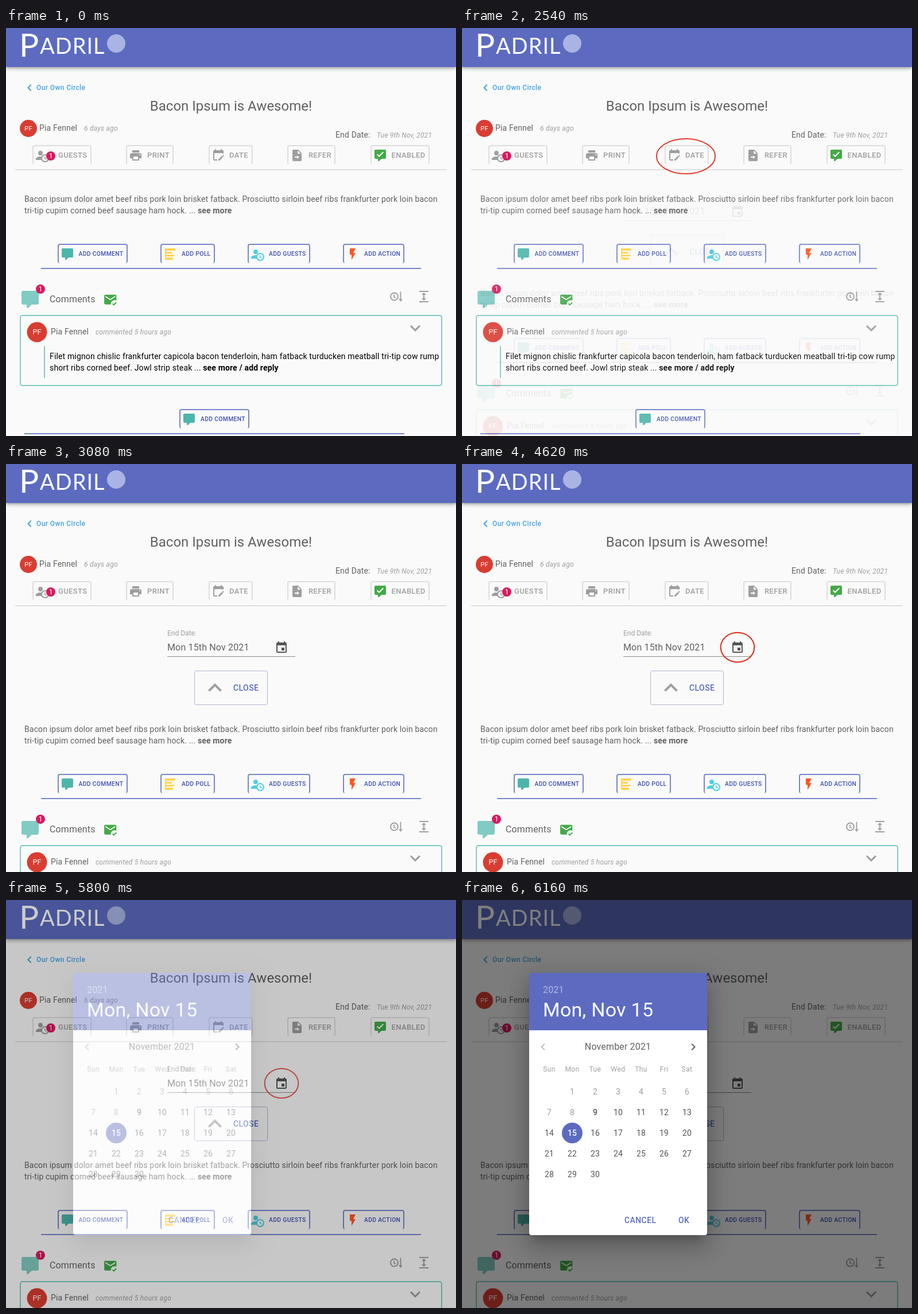
Animation of 784 by 711 pixels, one loop 8160 ms. Source, as an HTML page:

```html
<!DOCTYPE html>
<html lang="en">
<head>
<meta charset="utf-8">
<title>Discussion end date</title>
<style>
html, body { margin: 0; width: 100%; height: 100%; overflow: hidden; background: #fafafa; }
.scene { position: absolute; left: 0; top: 0; width: 784px; height: 711px; overflow: hidden; background: #fafafa; }
.scene > * { position: absolute; left: 0; top: 0; }
svg { width: 784px; height: 711px; font-family: Roboto, sans-serif; fill-rule: evenodd; }
svg text { white-space: pre; }
.bar { width: 784px; height: 68px; background: #5c6bc0;
  box-shadow: 0 2px 4px -1px #0003, 0 4px 5px #00000024, 0 1px 10px #0000001f; }
.shade { width: 784px; height: 711px; background: #00000080; }
.scene > .card { left: 117px; top: 127px; width: 310px; height: 457px; border-radius: 4px;
  background: linear-gradient(#5c6bc0 100px, #fff 100px);
  box-shadow: 0 11px 15px -7px #0003, 0 24px 38px 3px #00000024, 0 9px 46px 8px #0000001f; }
</style>
</head>
<body>
<script>
const GREY = '#9e9e9e', LIGHT = '#dedede', INK = '#616161', INDIGO = '#5c6bc0', EDGE = '#7986cb',
  DEEP = '#3f51b5', MINT = '#80cbc4', GREEN = '#43a947', RED = '#d93d32', PINK = '#d81b60';

// Icons on a 24 px grid
const COMMENT = 'M9,22A1,1 0 0,1 8,21V18H4A2,2 0 0,1 2,16V4C2,2.89 2.9,2 4,2H20A2,2 0 0,1 22,4V16A2,2 0 0,1 20,18H13.9L10.2,21.71C10,21.9 9.75,22 9.5,22Z';
const ICON = {
  comment: COMMENT,
  enabled: COMMENT + 'M16.6 5.6L10 12.2 7.4 9.6 6 11 10 15 18 7Z',
  left: 'M15.41,16.58L10.83,12L15.41,7.41L14,6L8,12L14,18Z',
  right: 'M8.59,16.58L13.17,12L8.59,7.41L10,6L16,12L10,18Z',
  down: 'M7.41,8.58L12,13.17L16.59,8.58L18,10L12,16L6,10Z',
  up: 'M7.41,15.41L12,10.83L16.59,15.41L18,14L12,8L6,14Z',
  guests: 'M10.63,14.1C12.23,10.58 16.38,9.03 19.9,10.63C23.42,12.23 24.97,16.38 23.37,19.9C22.24,22.4 19.75,24 17,24C14.3,24 11.83,22.44 10.67,20H1V18C1.06,16.86 1.84,15.93 3.34,15.18C4.84,14.43 6.72,14.04 9,14C9.57,14 10.11,14.05 10.63,14.1ZM5.07,8A3.93,3.97 0 1,1 12.93,8A3.93,3.97 0 1,1 5.07,8ZM17,22A5,5 0 0,0 22,17A5,5 0 0,0 17,12A5,5 0 0,0 12,17A5,5 0 0,0 17,22M16,14H17.5V16.82L19.94,18.23L19.19,19.53L16,17.69V14Z',
  print: 'M18,3H6V7H18M19,12A1,1 0 0,1 18,11A1,1 0 0,1 19,10A1,1 0 0,1 20,11A1,1 0 0,1 19,12M16,19H8V14H16M19,8H5A3,3 0 0,0 2,11V17H6V21H18V17H22V11A3,3 0 0,0 19,8Z',
  date: 'M19,3H18V1H16V3H8V1H6V3H5A2,2 0 0,0 3,5V19A2,2 0 0,0 5,21H10V19H5V8H19V9H21V5A2,2 0 0,0 19,3M21.7,13.35L20.7,14.35L18.65,12.35L19.65,11.35C19.85,11.14 20.19,11.13 20.42,11.35L21.7,12.63C21.89,12.83 21.89,13.15 21.7,13.35M12,18.94L18.07,12.88L20.12,14.88L14.06,21H12Z',
  refer: 'M13,9V3.5L18.5,9M6,2C4.89,2 4,2.89 4,4V20A2,2 0 0,0 6,22H18A2,2 0 0,0 20,20V8L14,2ZM8 14h4v-2l4 3-4 3v-2h-4z',
  poll: 'M2 2H20V6H4V8H14V11H4V13H18V16H4V18H16V22H2Z',
  flash: 'M7,2V13H10V22L17,10H13L17,2Z',
  mail: 'M13 19c0-3.31 2.69-6 6-6 1.1 0 2.12.3 3 .81V6a2 2 0 0 0-2-2H4c-1.11 0-2 .89-2 2v12a2 2 0 0 0 2 2h9.09c-.05-.33-.09-.66-.09-1M4 8V6l8 5 8-5v2l-8 5-8-5m13.75 14.16-2.75-3L16.16 18l1.59 1.59L21.34 16l1.16 1.41-4.75 4.75',
  expand: 'M4 2H20V4H4ZM4 20H20V22H4ZM13 9h3l-4-4-4 4h3v6H8l4 4 4-4h-3z',
  calendar: 'M19,19H5V8H19M16,1V3H8V1H6V3H5C3.89,3 3,3.89 3,5V19A2,2 0 0,0 5,21H19A2,2 0 0,0 21,19V5C21,3.89 20.1,3 19,3H18V1M17,12H12V17H17Z'
};

const text = (x, y, s, size, fill, more = '', gap = .15) =>
  `<text x="${x}" y="${y}" font-size="${size}" fill="${fill}" letter-spacing="${gap}" ${more}>${s}</text>`;
const mid = 'text-anchor="middle"', medium = 'font-weight="500"', italic = 'font-style="italic"';
const icon = (name, x, y, fill, k = 1) =>
  `<path d="${ICON[name]}" fill="${fill}" transform="translate(${x} ${y}) scale(${k})"/>`;
const rect = (x, y, w, h, fill) => `<rect x="${x}" y="${y}" width="${w}" height="${h}" fill="${fill}"/>`;
const frame = (x, y, w, h, stroke, width) =>
  `<rect x="${x}" y="${y}" width="${w}" height="${h}" rx="3.5" fill="none" stroke="${stroke}" stroke-width="${width}"/>`;
const disc = (x, y, r, fill) => `<circle cx="${x}" cy="${y}" r="${r}" fill="${fill}"/>`;
const badge = (x, y) => disc(x, y, 8, PINK) + text(x, y + 4, 1, 12, '#fff', mid, 0);
const ring = (x, y, rx, ry) =>
  `<ellipse cx="${x}" cy="${y}" rx="${rx}" ry="${ry}" fill="none" stroke="#dd2c1a" stroke-width="2"/>`;

// Rounded outline without a bottom edge; its sides taper off
function tab(l, r, t, fill) {
  const b = t + 34;
  return `<path fill="${fill}" d="M${l + 4} ${b}A4 4 0 0 1 ${l} ${b - 4}V${t + 4}a4 4 0 0 1 4 -4H${r - 4}a4 4 0 0 1 4 4V${b - 4}a4 4 0 0 1 -4 4A2 4 0 0 0 ${r - 2} ${b - 4}V${t + 4}a2 2 0 0 0 -2 -2H${l + 4}a2 2 0 0 0 -2 2V${b - 4}A2 4 0 0 0 ${l + 4} ${b}Z"/>`;
}
const tool = (l, r, name, ix, tx, label, fill = GREY) =>
  tab(l, r, 204, LIGHT) + icon(name, ix, 210, fill) + text(tx, 226, label, 13, GREY, medium, .37);
const add = (l, r, t, name, ix, tx, label, fill) =>
  tab(l, r, t, EDGE) + icon(name, ix, t + 6, fill) + text(tx, t + 21, label, 10.4, DEEP, medium, .297);

const header = () =>
  text(23, 50, 'P', 57, '#fff', 'font-family="Lato, sans-serif"', 0) +
  text(59, 45, 'ADRIL', 38, '#fff', 'font-family="Lato, sans-serif"', 1) +
  disc(192, 27, 16, '#a9b4e4') +
  icon('left', 29, 92, '#42a0dc') + text(53, 108, 'Our Own Circle', 12, '#42a5e5', medium, .4) +
  text(392, 144, 'Bacon Ipsum is Awesome!', 24, INK, mid, 0) +
  disc(39, 175, 15, RED) + text(39, 179, 'PF', 11, '#fff', mid) +
  text(58, 179, 'Pia Fennel', 14, INK) + text(136, 179, '6 days ago', 12, GREY, italic, .26) +
  text(574, 191, 'End Date:', 14, INK) + text(646, 191, 'Tue 9th Nov, 2021', 12, GREY, italic, .2) +
  tool(46, 149, 'guests', 51, 91, 'GUESTS') + badge(78, 223) +
  tool(209, 292, 'print', 214, 246, 'PRINT') +
  tool(353, 430, 'date', 358, 389, 'DATE') +
  tool(490, 574, 'refer', 495, 527, 'REFER') +
  tool(635, 738, 'enabled', 640, 671.5, 'ENABLED', GREEN) +
  rect(16, 246, 752, 2, '#e0e0e0');

const bold = s => `<tspan font-weight="700">${s}</tspan>`;
const content = shift => `<g transform="translate(0 ${shift})">` +
  text(32, 303, 'Bacon ipsum dolor amet beef ribs pork loin brisket fatback. Prosciutto sirloin beef ribs frankfurter pork loin bacon', 14, INK) +
  text(32, 323, 'tri-tip cupim corned beef sausage ham hock. ... ' + bold('see more'), 14, INK) +
  add(90, 212, 376, 'comment', 95, 126.5, 'ADD COMMENT', '#4db6ac') +
  add(269, 364, 376, 'poll', 275, 306, 'ADD POLL', '#ffd54f') +
  add(421, 530, 376, 'guests', 426, 458, 'ADD GUESTS', '#4dd0e1') +
  add(587, 694, 376, 'flash', 592, 624, 'ADD ACTION', '#ff5722') +
  rect(61, 418, 662, 2, EDGE) +
  icon('comment', 24, 455, MINT, 1.5) + badge(60, 455) +
  text(76, 478, 'Comments', 16, INK) + icon('mail', 169, 460.5, GREEN, 1.06) +
  `<path d="M676 464.5v4l3 2M687.5 459.5v14" fill="none" stroke="${GREY}" stroke-width="1.8"/>` +
  `<circle cx="676.5" cy="468" r="6.5" fill="none" stroke="${GREY}" stroke-width="2"/>` +
  `<path d="M684 472.5h7l-3.5 4.5z" fill="${GREY}"/>` +
  icon('expand', 716, 456, GREY) +
  frame(25, 501, 734, 122, MINT, 2) +
  disc(54, 530, 17.5, RED) + text(54, 534, 'PF', 12.5, '#fff', mid) +
  text(78, 534, 'Pia Fennel', 14, INK) + text(156, 534, 'commented 5 hours ago', 12, GREY, italic, .26) +
  icon('down', 695, 505, GREY, 1.5) + rect(66, 554, 2, 56, MINT) +
  text(76, 577, 'Filet mignon chislic frankfurter capicola bacon tenderloin, ham fatback turducken meatball tri-tip cow rump', 14, '#000') +
  text(76, 597, 'short ribs corned beef. Jowl strip steak ... ' + bold('see more / add reply'), 14, '#000') +
  add(302, 424, 664, 'comment', 307, 339, 'ADD COMMENT', '#4db6ac') +
  rect(32, 706, 662, 2, EDGE) + '</g>';

const field = () =>
  text(281, 299, 'End Date:', 12, GREY, '', 0) + text(281, 325, 'Mon 15th Nov 2021', 16, INK) +
  rect(281, 335, 223, 1, '#8c8c8c') + icon('calendar', 468, 308, '#555') +
  frame(328.5, 360.5, 127, 59, '#aeb5d6', 1) + icon('up', 340, 366, GREY, 2) +
  text(396, 395, 'CLOSE', 14, INDIGO, medium, .4);

function picker() {
  let s = text(141, 162, '2021', 16, '#ffffff8a') + text(141, 203, 'Mon, Nov 15', 34, '#fff', '', .25) +
    icon('left', 129.3, 244, '#bdbdbd') + icon('right', 391, 244, INK) +
    text(271.5, 261, 'November 2021', 16, INK, mid) + disc(192, 406, 18, INDIGO) +
    text(283, 563, 'CANCEL', 14, INDIGO, medium, .4) + text(377, 563, 'OK', 14, INDIGO, medium, .4);
  ['Sun', 'Mon', 'Tue', 'Wed', 'Thu', 'Fri', 'Sat'].forEach((d, i) => {
    s += text(152 + 40 * i, 299, d, 12, GREY, mid, .4);
  });
  for (let d = 1; d <= 30; d++) {
    const fill = d < 9 ? GREY : d === 15 ? '#fff' : '#555';
    const weight = d === 9 || d === 15 ? medium : '';
    s += text(152 + 40 * (d % 7), 339 + 36 * Math.floor(d / 7), d, 14, fill, mid + weight);
  }
  return s;
}

const svg = s => `<svg viewBox="0 0 784 711">${s}</svg>`;
const page = (open, extra = '') =>
  '<div class="bar"></div>' + svg(header() + (open ? field() : '') + content(open ? 164 : 0) + extra);

const layers = [
  page(false),
  page(false, ring(390, 223.5, 51, 30.5)),
  page(true),
  page(true, ring(480, 319.5, 29.3, 25.8)),
  page(true) + '<div class="shade"></div><div class="card"></div>' + svg(picker())
].map(html => {
  const el = document.createElement('div');
  el.className = 'scene';
  el.innerHTML = html;
  return document.body.appendChild(el);
});

// Each scene fades in over the last one in ten steps of 60 ms
const LOOP = 8160, PERIOD = 1540, STEP = 60;
function draw() {
  const t = performance.now() % LOOP;
  layers.forEach((el, i) => {
    if (!i) return;
    const start = 1000 + (i - 1) * PERIOD;
    const step = Math.floor((t - start) / STEP) + 1;
    el.style.opacity = Math.min(Math.max(step / 10, 0), 1);
  });
  requestAnimationFrame(draw);
}
draw();
</script>
</body>
</html>
```
